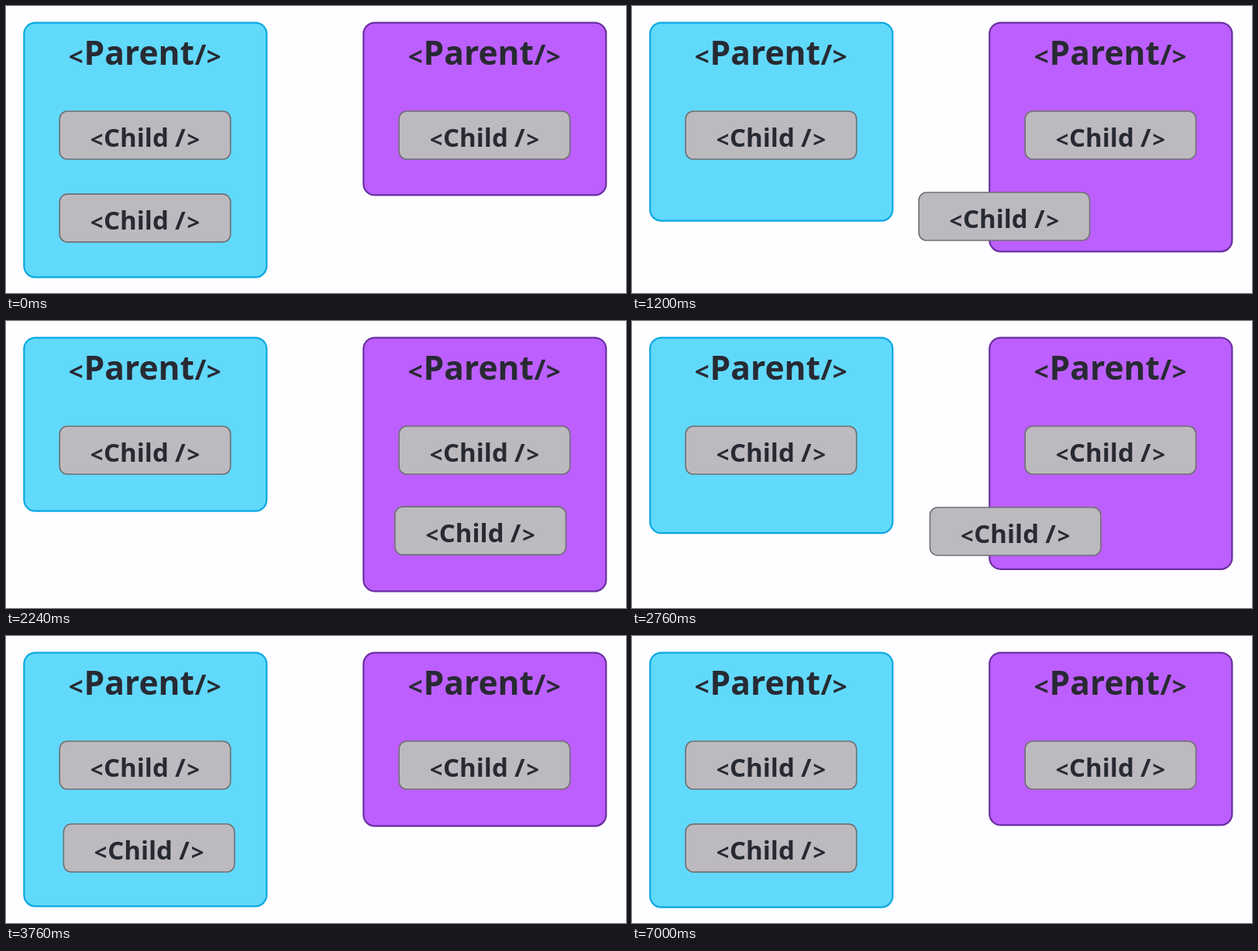
Recreate the animation shown at these times as an HTML page. Size 800x371 px, loop 7.04 s.

```html
<!DOCTYPE html>
<html lang="en">
<head>
<meta charset="utf-8">
<title>Child moving between parents</title>
<style>
  html, body { margin: 0; height: 100%; overflow: hidden; background: #fefdff; }
  svg { display: block; width: 800px; height: 371px; }
  text { font: bold 33px "Noto Sans", "Open Sans", sans-serif; fill: #282a33; }
  .title { font-size: 42.5px; }
  .title .slash { font-size: 36px; }
  .title .angle { font-size: 33px; }
  .angle { font-size: 29px; }
  .parent { stroke-width: 2.2; }
  .child { fill: #bcbabf; stroke: #707074; stroke-width: 1.6; }
</style>
</head>
<body>
<svg viewBox="0 0 800 371">
  <defs>
    <text id="title" class="title" y="75.7">
      <tspan class="angle" x="80.8" y="77.3">&lt;</tspan><tspan x="100.6" y="75.7">Parent</tspan><tspan class="slash" x="243.4" y="76.3">/</tspan><tspan class="angle" x="258.8" y="77.3">&gt;</tspan>
    </text>
    <g id="child">
      <rect class="child" x=".5" y=".5" width="220.5" height="62" rx="10"/>
      <text>
        <tspan class="angle" x="40" y="47.5">&lt;</tspan><tspan x="57.4" y="46.6">Child</tspan><tspan x="149.4" y="46.6">/</tspan><tspan class="angle" x="164.8" y="47.5">&gt;</tspan>
      </text>
    </g>
  </defs>
  <rect id="left" class="parent" x="23.3" y="21.6" width="313" height="329" rx="14.5" fill="#61d9fb" stroke="#0ba8e2"/>
  <rect id="right" class="parent" x="461.3" y="21.6" width="313" height="222.8" rx="14.5" fill="#bd5fff" stroke="#6a2fa3"/>
  <use href="#title"/>
  <use href="#title" x="438"/>
  <use href="#child" x="68.7" y="135.5"/>
  <use href="#child" x="506.7" y="135.5"/>
  <use id="mover" href="#child"/>
</svg>
<script>
  const LOOP = 7040, MOVE = 1960;
  const TALL = 329, SHORT = 222.8;
  const [left, right, mover] = ["left", "right", "mover"].map(id => document.getElementById(id));

  const mix = (a, b, k) => a + (b - a) * k;

  // Smooth 0..1 ramp beginning at the given time
  function ramp(time, start) {
    const p = Math.min(1, Math.max(0, (time - start) / MOVE));
    return p ** 3 * (10 - 15 * p + 6 * p * p);
  }

  function draw(now) {
    const time = now % LOOP;
    const k = ramp(time, 20) - ramp(time, 2020);
    left.setAttribute("height", mix(TALL, SHORT, k));
    right.setAttribute("height", mix(SHORT, TALL, k));
    mover.setAttribute("x", mix(68.7, 506.7, k));
    mover.setAttribute("y", mix(242.6, 239.6, k));
  }

  const origin = performance.now();
  function tick() {
    draw(performance.now() - origin);
    requestAnimationFrame(tick);
  }
  tick();
</script>
</body>
</html>
```
